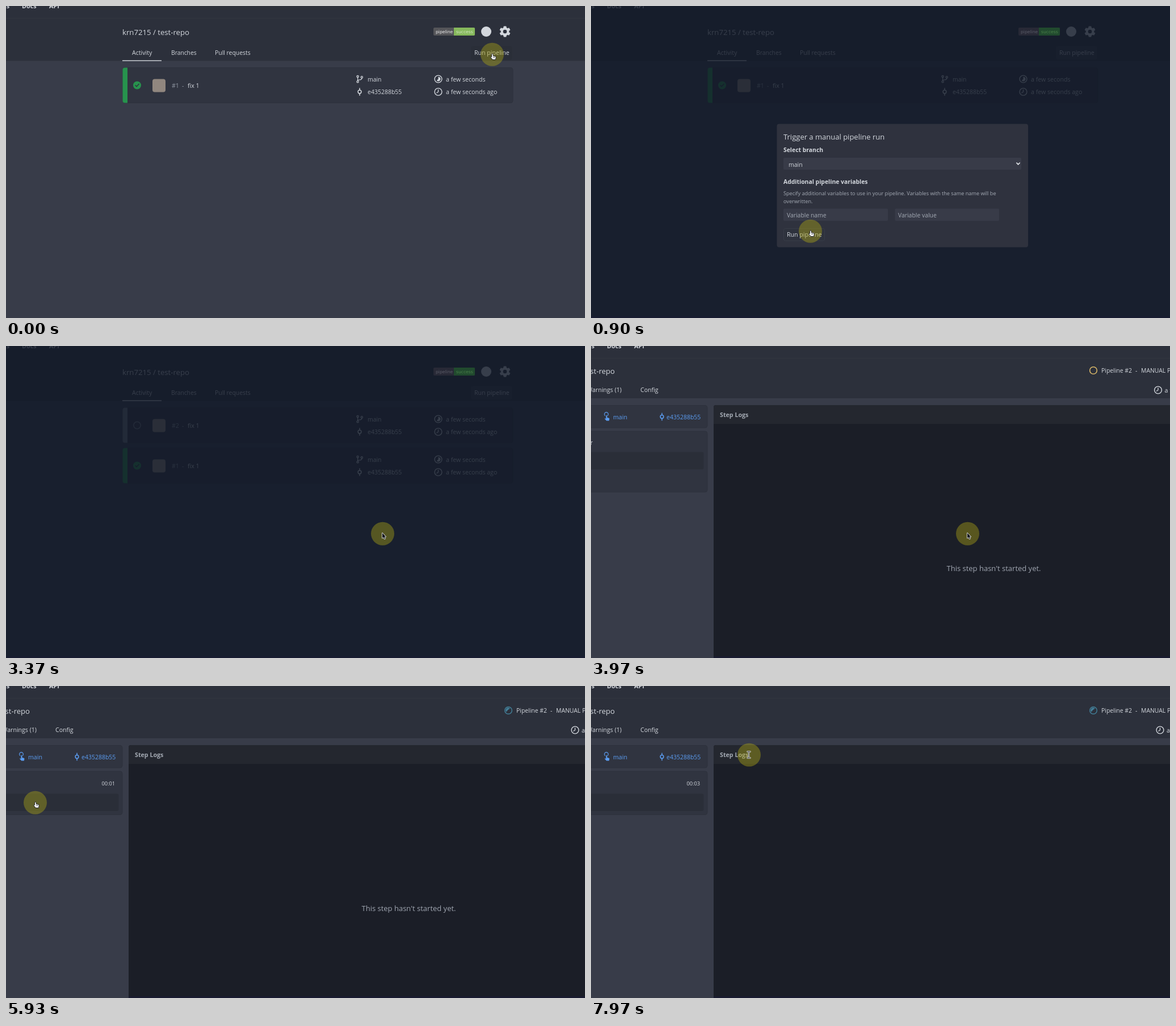
Recreate the animation shown at these times as an HTML page with a canvas. Size 1020 by 549 pixels, loop 8000 ms.

```html
<!DOCTYPE html>
<html lang="en">
<head>
<meta charset="utf-8">
<title>Pipeline run</title>
<style>
html, body { margin: 0; width: 100%; height: 100%; overflow: hidden; background: #383c49; }
canvas { display: block; }
</style>
</head>
<body>
<canvas id="stage" width="1020" height="549"></canvas>
<script>
const ctx = document.getElementById('stage').getContext('2d');
const W = 1020, H = 549, LOOP = 8000;
const SANS = '"Open Sans", "Noto Sans", sans-serif';
const BADGE = '"DejaVu Sans", sans-serif';
const C = {
  page: '#383c49', header: '#2c303b', card: '#303440', cardEdge: '#2d313c', line: '#323640',
  text: '#d3d7dd', muted: '#9299a4', link: '#5b9df2', green: '#27934d',
  amber: '#d8b668', teal: '#43809a', panel: '#1b1e27', panelHead: '#24272f', selected: '#2a2e38'
};

// Event times in ms
const T = {
  open: 130, close: 1060, added: 3370, pending: 3570, details: 3970,
  running: 4330, loaded: 5000, select: 5730, cleared: 6080
};
const ticks = [5600, 6600, 7630];

// Pointer path: time, x, y
const path = [
  [0, 856, 85], [180, 856, 85], [840, 386, 396], [960, 386, 396], [1230, 462, 432],
  [1640, 663, 331], [1730, 663, 330], [3990, 663, 330], [4770, 133, 209],
  [5130, 82, 212], [5250, 82, 212], [5300, 51, 205], [5950, 51, 205],
  [6430, 199, 8], [6650, 199, -26], [7640, 217, -26], [7960, 278, 121], [8000, 278, 121]
];
const pointers = [
  [0, 'hand'], [260, 'arrow'], [790, 'hand'], [1080, 'arrow'], [4620, 'hand'],
  [6080, 'arrow'], [7910, 'beam']
];

const clamp01 = v => Math.max(0, Math.min(1, v));
const ramp = (t, start, length) => clamp01((t - start) / length);

function pointerAt(t) {
  let i = 0;
  while (i < path.length - 2 && path[i + 1][0] <= t) i++;
  const [t0, x0, y0] = path[i], [t1, x1, y1] = path[i + 1];
  const k = clamp01((t - t0) / (t1 - t0)), e = k * k * (3 - 2 * k);
  return [x0 + (x1 - x0) * e, y0 + (y1 - y0) * e];
}

function text(str, x, y, { size = 10.6, color = C.text, weight = 400, align = 'left', font = SANS } = {}) {
  ctx.font = `${weight} ${size}px ${font}`;
  ctx.fillStyle = color;
  ctx.textAlign = align;
  ctx.fillText(str, x, y);
}

function rect(x, y, w, h, color) {
  ctx.fillStyle = color;
  ctx.fillRect(x, y, w, h);
}

function box(x, y, w, h, r, color, edge) {
  ctx.beginPath();
  ctx.roundRect(x, y, w, h, r);
  ctx.fillStyle = color;
  ctx.fill();
  if (edge) {
    ctx.strokeStyle = edge;
    ctx.lineWidth = 1;
    ctx.stroke();
  }
}

function disc(x, y, r, color) {
  ctx.beginPath();
  ctx.arc(x, y, r, 0, 7);
  ctx.fillStyle = color;
  ctx.fill();
}

function ring(x, y, r, color, width = 1.4) {
  ctx.beginPath();
  ctx.arc(x, y, r, 0, 7);
  ctx.strokeStyle = color;
  ctx.lineWidth = width;
  ctx.stroke();
}

function stroke(d, x, y, color, width = 1.4) {
  ctx.save();
  ctx.translate(x, y);
  ctx.strokeStyle = color;
  ctx.lineWidth = width;
  ctx.lineJoin = ctx.lineCap = 'round';
  ctx.stroke(new Path2D(d));
  ctx.restore();
}

function shape(d, x, y, fill, edge) {
  ctx.save();
  ctx.translate(x, y);
  const p = new Path2D(d);
  if (edge) {
    ctx.strokeStyle = edge;
    ctx.lineWidth = 1.6;
    ctx.lineJoin = 'round';
    ctx.stroke(p);
  }
  ctx.fillStyle = fill;
  ctx.fill(p);
  ctx.restore();
}

function clock(x, y) {
  ring(x, y, 6.4, C.text);
  stroke('M0 -3.6 V0 L-2.6 1.8', x, y, C.text, 1.3);
}

function timelapse(x, y) {
  ring(x, y, 6.4, C.text);
  shape('M0 -4 A4 4 0 1 1 -2.8 2.8 L0 0 Z', x, y, C.text);
}

function commit(x, y, color) {
  ring(x, y, 2.9, color, 1.5);
  stroke('M0 -6.2 V-3.2 M0 3.2 V6.2', x, y, color, 1.5);
}

function branch(x, y) {
  ring(x - 3.4, y - 4.6, 1.6, C.text, 1.3);
  ring(x - 3.4, y + 4.8, 1.6, C.text, 1.3);
  ring(x + 3.8, y - 3.2, 1.6, C.text, 1.3);
  stroke('M-3.4 -2.8 V3 M3.8 -1.4 Q3.8 1.2 0 1.4 Q-3 1.6 -3.4 3', x, y, C.text, 1.3);
}

function gear(x, y) {
  ctx.save();
  ctx.translate(x, y);
  ctx.fillStyle = C.text;
  for (let i = 0; i < 6; i++) {
    ctx.beginPath();
    ctx.roundRect(-2.5, -9.6, 5, 5, 0.8);
    ctx.fill();
    ctx.rotate(Math.PI / 3);
  }
  ctx.restore();
  disc(x, y, 7.4, C.text);
  disc(x, y, 3.3, C.header);
}

function navBar(height) {
  rect(0, 0, W, H, C.page);
  rect(0, 0, W, height, C.header);
  rect(0, 21, W, 1, C.line);
  const style = { size: 10.8, weight: 700 };
  text('es', 6, 4, { ...style, align: 'right' });
  text('Docs', 28, 4, style);
  text('API', 76, 4, style);
}

function badge(dark) {
  const size = 7.6;
  box(753, 38, 73, 14, 2, dark ? '#282936' : '#555559');
  box(789, 38, 37, 14, [0, 2, 2, 0], dark ? '#214a2e' : '#86b85c');
  text('pipeline', 757, 47.8, { size, font: BADGE, color: dark ? '#5b5d69' : '#f0f0f0' });
  text('success', 793, 47.8, { size, font: BADGE, color: dark ? '#4a7f4b' : '#d3e6c2' });
}

function runRow(y, number, color, done) {
  box(206, y, 687, 62, 4, C.card, C.cardEdge);
  box(205.5, y, 8.5, 62, [4, 0, 0, 4], color);
  if (done) {
    disc(231, y + 31, 7, color);
    stroke('M-3 0 L-1 2.2 L3.2 -2.2', 231, y + 31, C.card, 1.5);
  } else {
    ring(231, y + 31, 6.2, color, 1.5);
  }
  box(258, y + 20, 23, 23, 4, '#91877f');
  text('#' + number, 292, y + 35, { color: C.muted });
  text('-', 310, y + 35, { color: C.muted });
  text('fix 1', 320, y + 35);
  branch(623, y + 20);
  text('main', 637, y + 24, { size: 10.4 });
  commit(623, y + 42.5, C.text);
  text('e435288b55', 637, y + 46.5, { size: 10.5 });
  timelapse(761.5, y + 20);
  text('a few seconds', 775, y + 24);
  clock(761.5, y + 42.5);
  text('a few seconds ago', 775, y + 46.5);
}

function repoPage(t) {
  navBar(96.5);
  text('krn7215 / test-repo', 205, 50.5, { size: 13.2 });
  badge(false);
  disc(846, 45, 9, C.text);
  gear(879, 45);
  text('Activity', 222, 85.5);
  text('Branches', 291, 85.5, { size: 10.3 });
  text('Pull requests', 368, 85.5, { size: 10.4 });
  rect(205, 95.5, 69, 1.4, C.text);
  box(819.5, 70.5, 72, 24, 3, t < T.open ? '#2a2e38' : '#363a46');
  text('Run pipeline', 825, 86);

  if (t >= T.added) {
    runRow(108.5, 2, t < T.pending ? '#6b717c' : C.amber, false);
    runRow(179.5, 1, C.green, true);
  } else {
    runRow(108.5, 1, C.green, true);
  }

  const shade = ramp(t, T.open, 200);
  ctx.globalAlpha = shade * 0.8;
  rect(0, 0, W, H, '#111827');
  ctx.globalAlpha = shade;
  if (shade) {
    badge(true);
    rect(0, 546, W, 3, '#181c31');
  }
  ctx.globalAlpha = shade * (1 - ramp(t, T.close, 130));
  if (ctx.globalAlpha) modal();
  ctx.globalAlpha = 1;
}

function modal() {
  const field = '#383b48', label = { size: 10.4, weight: 700 };
  const note = { size: 9.15, color: '#a5abb5' }, hint = { size: 10.4, color: '#a5abb5' };
  box(327.5, 207.5, 442.5, 217, 4, '#2f323e');
  text('Trigger a manual pipeline run', 339, 234.5, { size: 13 });
  text('Select branch', 339, 256.5, label);
  box(339, 267, 419, 21, 2, field);
  text('main', 348, 282.5, { size: 10.5 });
  stroke('M-2.6 -1.4 L0 1.4 L2.6 -1.4', 752.5, 277.5, '#e3e6ea', 1.6);
  text('Additional pipeline variables', 339, 312.7, label);
  text('Specify additional variables to use in your pipeline. Variables with the same name will be', 339, 332.5, note);
  text('overwritten.', 339, 346.5, note);
  box(339, 356.5, 184, 21.5, 2, field);
  text('Variable name', 345, 371.7, hint);
  box(535.5, 356.5, 183.5, 21.5, 2, field);
  text('Variable value', 541, 371.7, hint);
  box(339.5, 391.5, 72, 21.5, 3, '#2e323d', '#383c48');
  text('Run pipeline', 345, 406.2);
}

function detailsPage(t) {
  const running = t >= T.running, second = t >= T.select;
  navBar(92);
  text('st-repo', 42, 48.5, { size: 13.1, align: 'right' });
  text('Warnings (1)', 54, 81, { align: 'right' });
  text('Config', 87, 81);
  if (running) {
    ring(885, 43, 6.3, C.teal, 1.4);
    shape('M-3.6 2.8 A4.4 4.4 0 0 1 3 -3.4 L-1 -.8 Z', 885, 43, C.teal);
  } else {
    ring(885, 43, 6.3, C.amber, 1.6);
  }
  text('Pipeline #2', 899, 47, { size: 10.4 });
  text('-', 959, 47, { size: 10.4 });
  text('MANUAL PIPELINE', 969, 47, { size: 10.4 });
  clock(running ? 1002.5 : 999, 77.5);
  text('a few seconds', running ? 1014 : 1010.5, 81.5);

  box(-8, 104.5, 213, 39.5, 4, C.card, C.cardEdge);
  shape('M-1.6 -2 Q-1.6 -3.2 -.6 -3.2 Q.4 -3.2 .4 -2 V1 L3.6 1.8 Q4.6 2.2 4.4 3.4 L3.8 6.4 H-.8 L-4 3 L-3.2 2.2 L-1.6 3 Z', 28, 125, C.link);
  stroke('M-3 -.6 A3.4 3.4 0 1 1 1.8 -.6', 27.6, 123, C.link, 1.1);
  text('main', 39, 128.5, { color: C.link });
  commit(125, 124.5, C.link);
  text('e435288b55', 133, 128.5, { color: C.link, size: 10.5 });

  box(-8, 150, 213, running ? 76.5 : 107, 4, C.card, C.cardEdge);
  box(-8, !running ? 186.5 : second ? 189.5 : 156, 206.5, 30.5, 3, C.selected);
  if (running) {
    const seconds = ticks.filter(at => t >= at).length;
    text('00:0' + seconds, 168.5, 174.5, { size: 9.2 });
  } else {
    text('r', 3, 174, { align: 'right' });
  }

  box(216, 104, 820, 460, 4, C.panel);
  box(216, 104, 820, 33, [4, 4, 0, 0], C.panelHead);
  text('Step Logs', 227, 125, { size: 10.7, weight: 700, color: '#a3a9b2' });
  const waiting = !running || (t >= T.select && t < T.cleared);
  const message = waiting ? "This step hasn't started yet." : t < T.loaded ? 'Loading...' : '';
  text(message, 709.5, 396, { size: 13, color: '#a0a6b1', align: 'center' });
  rect(216, 546, W - 216, 3, '#191b30');
}

function pointer(t) {
  const [x, y] = pointerAt(t);
  const kind = pointers.filter(([at]) => t >= at).pop()[1];
  disc(x + 0.5, y + 0.2, 20.5, 'rgba(172,165,20,.42)');
  if (kind === 'hand') {
    shape('M0 1 Q0 0 .9 0 Q1.8 0 1.8 1 V3.4 L5.8 4.2 Q7 4.6 6.8 6 L6 9.6 H1.4 L-2 5.6 Q-1.4 4.6 0 5.6 Z', x, y - 0.5, '#f4f4f4', '#20222a');
    stroke('M2.8 4.8 V6.4 M4.6 5 V6.4', x, y - 0.5, '#30323a', 0.7);
  } else if (kind === 'arrow') {
    shape('M0 0 V9 L2 7.2 L3.6 10.6 L5 10 L3.5 6.7 H6.2 Z', x, y - 1, '#14161c', '#e2e4e8');
  } else {
    const beam = 'M-2.5 -5.5 H2.5 M0 -5.5 V5.5 M-2.5 5.5 H2.5';
    stroke(beam, x, y, '#e4e4e4', 2.4);
    stroke(beam, x, y, '#24262c', 0.8);
  }
}

function draw(t) {
  (t < T.details ? repoPage : detailsPage)(t);
  pointer(t);
}

const start = performance.now();
function frame() {
  draw((performance.now() - start) % LOOP);
  requestAnimationFrame(frame);
}
frame();
</script>
</body>
</html>
```
